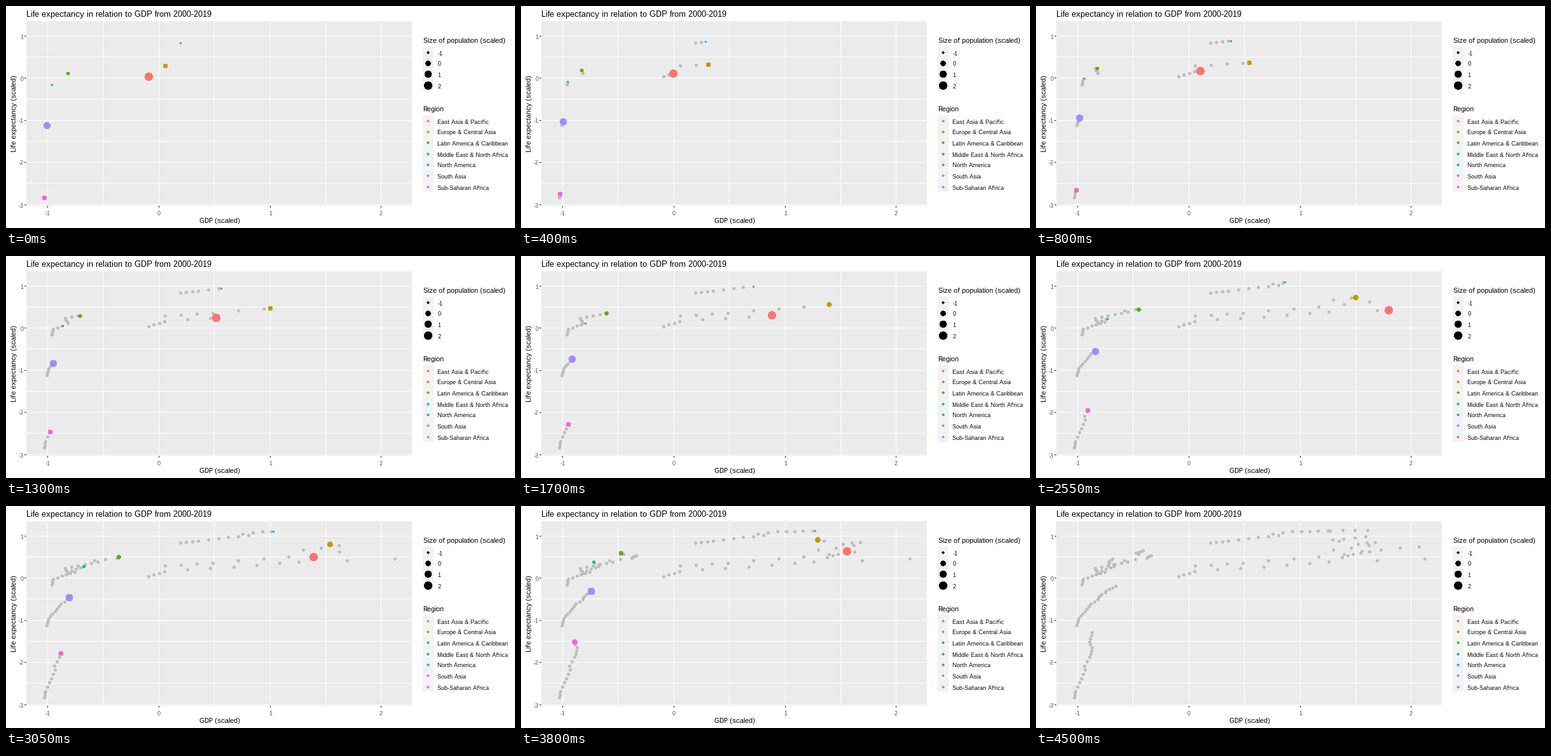
These frames come from a looping animation (800 by 350 pixels, 5 s). A matplotlib script:

```python
import math

import matplotlib.pyplot as plt
import numpy as np
from matplotlib.animation import FuncAnimation
from matplotlib.patches import Rectangle

plt.rcParams.update({
    "font.family": "Liberation Sans",
    "text.hinting": "native",
    "text.hinting_factor": 1,
})

WIDTH, HEIGHT, DPI = 800, 350, 100
FRAMES, INTERVAL = 100, 50
LAST_MOVING_FRAME = 89

YEARS = np.arange(20)
# Wealth turns at booms and slumps; the slump after year 14 is steepest at first.
WEALTH_TURNS = (0, 3, 8, 9, 11, 12, 14, 16, 19)
WEALTH_CLOCK = np.where(YEARS == 15, 15.7, YEARS)
LIFE_TURNS = (0, 3, 11, 19)

fig = plt.figure(figsize=(WIDTH / DPI, HEIGHT / DPI), dpi=DPI, facecolor="white")
ax = fig.add_axes([0, 0, 1, 1])
ax.set_xlim(-0.5, WIDTH - 0.5)
ax.set_ylim(HEIGHT - 0.5, -0.5)
ax.axis("off")


def box(x, y, w, h, color):
    """Fill w by h whole pixels from the pixel (x, y)."""
    ax.add_patch(Rectangle((x - 0.5, y - 0.5), w, h, facecolor=color,
                           linewidth=0, antialiased=False))


def text(x, y, label, size, color="black", **kw):
    ax.text(x, y, label, fontsize=size * 72 / DPI, color=color, va="baseline", **kw)


def area(radius):
    """Scatter size of a disc whose radius is given in pixels."""
    return (2 * np.asarray(radius) * 72 / DPI) ** 2


def dots(x, y, radius, color, zorder=3):
    # Two antialiasing flags bypass the marker shortcut, which always smooths edges.
    return ax.scatter(x, y, s=area(radius), c=color, linewidths=0,
                      antialiased=[False, False], zorder=zorder)


class Region:
    def __init__(self, name, color, radii, wealth, life):
        self.name, self.color = name, color
        self.xs = np.interp(WEALTH_CLOCK, WEALTH_TURNS, wealth)
        self.ys = np.interp(YEARS, LIFE_TURNS, life)
        self.radii = np.linspace(*radii, len(YEARS))

    def at(self, year):
        return [np.interp(year, YEARS, v) for v in (self.xs, self.ys, self.radii)]

    def past(self, count):
        return np.column_stack([self.xs[:count], self.ys[:count]])


REGIONS = [
    Region("East Asia & Pacific", "#F8766D", (5.9, 6.2),
           (224, 249, 430, 460, 611, 481, 498, 512, 602), (111, 103, 83, 64)),
    Region("Europe & Central Asia", "#C49A00", (3.4, 3.8),
           (250, 325, 524, 467, 523, 506, 533, 466, 518), (94, 90, 62, 48)),
    Region("Latin America & Caribbean", "#53B400", (2.3, 3.1),
           (97, 93, 144, 139, 174, 176, 181, 157, 168), (106, 98, 82, 70)),
    Region("Middle East & North Africa", "#00C094", (0.9, 2.2),
           (72, 74, 108, 103, 117, 122, 122, 114, 120), (124, 115, 97, 83)),
    Region("North America", "#00B6EB", (0.9, 1.55),
           (274, 302, 381, 372, 403, 417, 443, 462, 521), (58, 55, 40, 38)),
    Region("South Asia", "#A58AFF", (5, 5.4),
           (64, 67, 83, 86, 97, 98, 103, 110, 125), (188, 177, 147, 126)),
    Region("Sub-Saharan Africa", "#FB61D7", (3, 3.8),
           (60, 62, 77, 76, 84, 86, 88, 84, 88), (302, 292, 238, 199)),
]


def draw_panel():
    left, top, right, bottom = 32, 24, 638, 315
    box(left, top, right - left, bottom - top, "#EBEBEB")
    for step in range(-2, 5):
        x = round(239.8 + 174.8 * step / 2)
        box(x, top, 1, bottom - top, "white")
        if step % 2 == 0:
            box(x, bottom, 1, 3, "#333333")
            text(x, 329, str(step // 2), 9, "#4D4D4D", ha="center")
    for step in range(-6, 3):
        y = round(113.2 - 66.5 * step / 2)
        box(left, y, right - left, 1, "white")
        if step % 2 == 0:
            box(left - 3, y, 3, 1, "#333333")
            text(27, y + 4, str(step // 2), 9, "#4D4D4D", ha="right")
    text(32, 17, "Life expectancy in relation to GDP from 2000-2019", 13)
    text(335, 342, "GDP (scaled)", 11, ha="center")
    text(16, 169, "Life expectancy (scaled)", 11, rotation=90, rotation_mode="anchor",
         ha="center")


def draw_legend(title, top, entries):
    key = 17.28
    text(655, round(top) - 6, title, 11)
    box(655, round(top), 17, round(key * len(entries)), "#F2F2F2")
    for i, (label, radius, color) in enumerate(entries):
        y = round(top + key * (i + 0.5))
        dots(663, y, radius, color)
        text(678, y + 4, label, 9)


def year_at(frame):
    """Four steps per year up to year 13, then three; one extra frame rests on each."""
    if frame < 65:
        year, step = divmod(frame, 5)
        return year + step / 4
    year, step = divmod(frame - 65, 4)
    return 13 + year + step / 3


draw_panel()
draw_legend("Size of population (scaled)", 64.2,
            [(str(n), r, "black") for n, r in zip(range(-1, 3), (1.55, 3.9, 5.2, 6.1))])
draw_legend("Region", 172.2, [(r.name, 1.55, r.color) for r in REGIONS])

trail = dots([], [], 1.9, "#BEBEBE", zorder=4)
heads = dots([0] * len(REGIONS), [0] * len(REGIONS), 1,
             [r.color for r in REGIONS], zorder=5)


def update(frame):
    moving = frame <= LAST_MOVING_FRAME
    year = year_at(frame) if moving else len(YEARS)
    past = math.ceil(year)
    trail.set_offsets(np.round(np.vstack([r.past(past) for r in REGIONS])))
    heads.set_visible(moving)
    if moving:
        state = np.array([r.at(year) for r in REGIONS])
        heads.set_offsets(np.round(state[:, :2]))
        heads.set_sizes(area(state[:, 2]))
    return trail, heads


animation = FuncAnimation(fig, update, frames=FRAMES, interval=INTERVAL,
                          repeat=True, repeat_delay=0)
plt.show()
```
